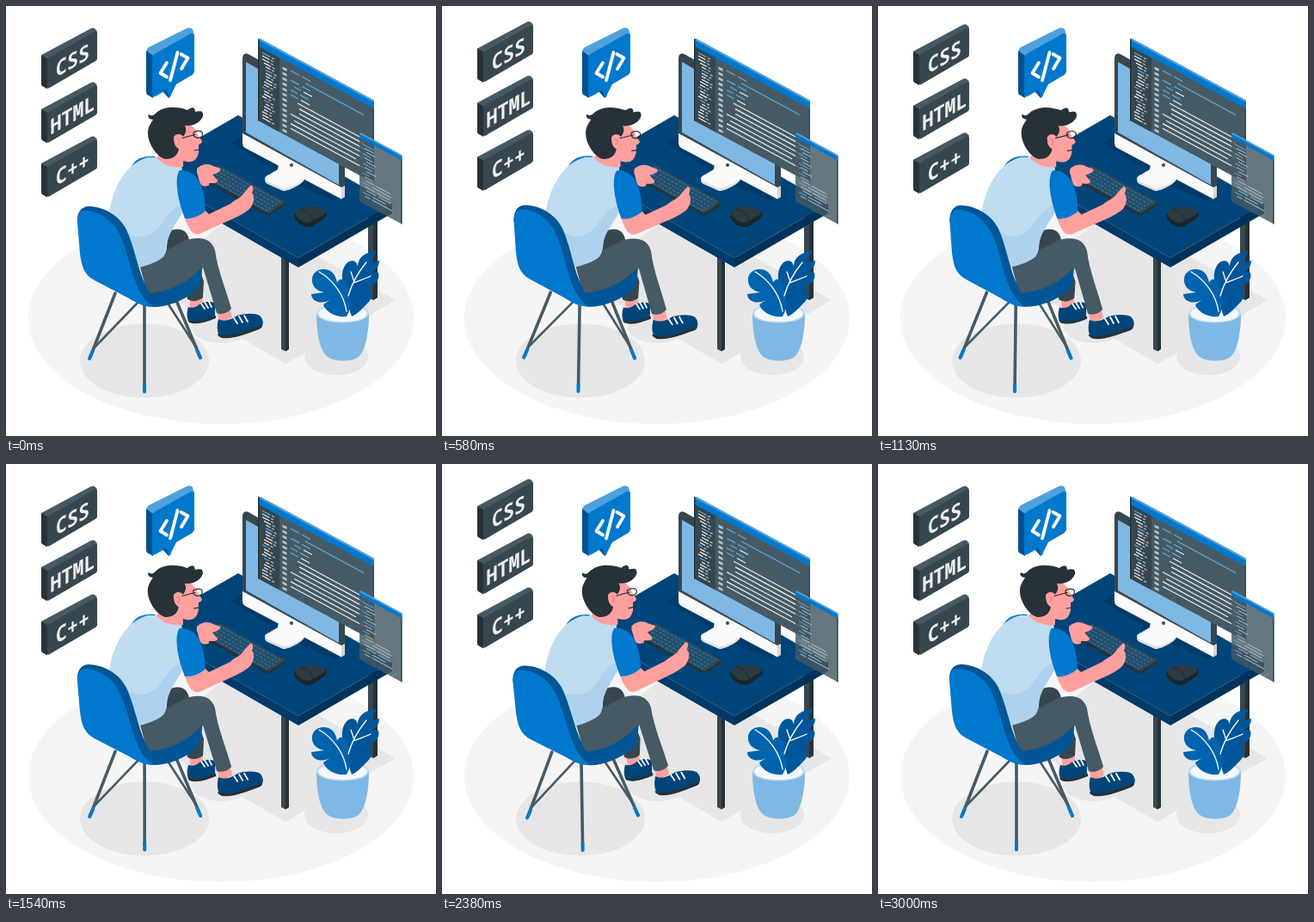
An HTML page for the animation above (3040 ms loop, 500x500 px).

```html
<!DOCTYPE html>
<html lang="en">
<head>
<meta charset="utf-8">
<title>Programmer at a desk</title>
<style>
html, body { margin: 0; width: 100%; height: 100%; overflow: hidden; background: #fff; }
svg { display: block; width: 100%; height: 100%; }
.line { fill: none; stroke-linecap: round; stroke-linejoin: round; }
.b { fill: #0078cd; } .navy { fill: #00457a; } .deep { fill: #00325a; }
.sky { fill: #7fb8e4; } .pale { fill: #bfdcf1; }
.ink { fill: #263238; } .slate { fill: #37474f; } .grey { fill: #455a64; }
.skin { fill: #ffa09f; } .shade { fill: #e6e6e6; }
#signs text { font: 700 25px "Noto Sans Mono", "DejaVu Sans Mono", monospace; fill: #f0f0f0; text-anchor: middle; }
</style>
</head>
<body>
<svg viewBox="0 0 500 500">
  <ellipse cx="250" cy="363" rx="224" ry="123" fill="#f5f5f5"/>
  <g class="shade">
    <path d="M453 342 325 416 161 321 270 240Z"/>
    <ellipse cx="250" cy="374" rx="34" ry="18"/>
    <ellipse cx="161" cy="412.500" rx="75" ry="43"/>
    <ellipse cx="384" cy="408" rx="37" ry="21.500"/>
  </g>

  <g id="desk">
    <path class="slate" d="M421 240h11v99l-5 3-6-3Z"/>
    <path class="ink" d="M427 240h5v99l-5 3Z"/>
    <path class="slate" d="M320 288h9v111l-4 2.500-5-2.500Z"/>
    <path class="ink" d="M325 288h4v111l-4 2.500Z"/>
    <path class="navy" d="M270 127 449 230 340 293 161 190Z"/>
    <path d="M161 190 340 293v11L161 201Z" fill="#003a68"/>
    <path class="deep" d="M340 293 449 230v11L340 304Z"/>
    <path d="M262 160 275 150 393 215 383 227 345 211Z" fill="#003a68"/>
  </g>

  <g id="monitor">
    <path d="M318 180 342 190 347 201C348 205 329 216 322 215L304 207C299 204 301 200 306 198L316 192Z" fill="#e0e0e0"/>
    <path d="M318 178 340 190 347 199C348 203 329 213 322 212L304 204C299 201 301 198 306 196L316 190Z" fill="#fafafa"/>
    <path class="slate" d="M275 61C275 56 278 54 282 56L391 118Q394 120 394 124V222L390 224 275 161Z"/>
    <path class="sky" d="M279 65 387 127V208L279 147Z"/>
    <path d="M275 148 390 211V224.500L278 165Q275 163 275 160Z" fill="#fafafa"/>
    <path d="M390 211 394 209V222L390 224.500Z" fill="#d5d5d5"/>
    <circle class="slate" cx="332" cy="185" r="2"/>
  </g>

  <g id="keyboard">
    <path class="ink" d="M248 186 325 227.500V231L305 244.500 229 203V199Z"/>
    <path class="slate" d="M248 185 325 228 305 241 229 199Z"/>
  </g>
  <path d="M335 244C339 234 352 232 364 235.500 373 237 376 242 370 247L357 256C349 260 336 252 335 244Z" fill="#1b252a"/>
  <path d="M336 241C341 232 353 232 364 235 371 237 374 240 369 243L355 251C348 255 338 247 336 241Z" fill="#2c3a41"/>
  <path class="line" d="M342 236C350 238 354 241 357 249" stroke="#1b252a"/>

  <g id="editor" transform="matrix(1 .54 0 1 293 38)">
    <rect class="grey" width="135" height="95"/>
    <rect class="slate" width="25" height="95"/>
    <rect class="b" width="135" height="8.500"/>
    <path d="M0 0 3-1.500H135V1H0Z" fill="#4da0dc"/>
    <path d="M0 0h1.500v95H0Z" fill="#263238"/>
    <path d="M133.500 8.500h1.500v86.500h-1.500Z" fill="#2c4a60"/>
  </g>
  <g id="panel" transform="matrix(1 .54 0 1 411 148)">
    <rect class="grey" width="49.500" height="79" opacity=".82"/>
    <rect class="b" width="49.500" height="5"/>
    <path d="M0 0 2-1.500H49.500V.5H0Z" fill="#4da0dc"/>
    <path d="M48 5h1.500v74H48Z" fill="#37474f"/>
  </g>

  <g id="plant">
    <path class="sky" d="M361 357C361 385 366 402 374 408 382 414 402 414 410 408 418 400 422 380 422 357Z"/>
    <ellipse class="pale" cx="391.500" cy="357" rx="30.500" ry="11.500"/>
    <ellipse cx="391.500" cy="357.500" rx="28" ry="9.500" fill="#f2f8fc"/>
    <path d="M402 361C397 350 399 338 392 322 389 312 392 301 399 297 405 295 408 298 409 303 409 292 418 286 431 285 427 291 425 295 424 299L434 296C434 303 430 307 426 309L433 310C435 318 430 324 421 326 428 332 426 341 420 346 414 352 409 358 402 361Z" fill="#00569a"/>
    <path d="M396 361C386 363 371 356 369 347L378 341C368 348 355 344 355 335L370 333C360 331 355 325 356 316 358 308 366 304 375 307 382 310 384 316 385 322 388 314 397 318 398 328 399 338 404 348 396 361Z" fill="#0063ae"/>
    <path class="line" d="M364 309C381 319 393 336 396 355M419 298C410 309 402 323 398 337M405 321 401 309M404 322C411 319 418 317 424 314" stroke="#fff" stroke-width="1.300"/>
  </g>

  <g id="bubble">
    <path d="M163 53Q163 50 166 48L210 26Q214 24 217 27L219 34 171 62Z" fill="#4da0dc"/>
    <path d="M163 52 171 58V107L164 103Q163 102 163 100Z" fill="#00508c"/>
    <path d="M182 99 187 97 192 104 189 107Z" fill="#00508c"/>
    <path class="b" d="M170 61Q170 57 174 55L214 32.500Q219 30.500 219 35V75Q219 79 215 81L198 91 190 107 186 98 174 105Q170 107 170 103Z"/>
    <path class="line" d="M187 66 179.500 78 187 82.500M199.500 54 191 86.500M203.500 56 211.500 60.500 204 73" stroke="#fff" stroke-width="3.800"/>
  </g>

  <g id="signs"></g>

  <g id="sitter">
    <path class="skin" d="M213 336 228 336 230 354 215 356Z"/>
    <path class="navy" d="M212 350C217 352 222 350 226 346 233 343 239 343 243 346V363C232 367 221 371 213 367 210 364 210 356 212 350Z"/>
    <path class="ink" d="M211 365C221 368 233 364 244 360V363C232 368 221 371 213 368Z"/>
    <path class="line" d="M227 346 231 352M231 344.500 235 351M236 344 239 350" stroke="#fff" stroke-width="1.700"/>
    <path class="slate" d="M180 268C195 256 210 256 213 272L230 320 229 339C223 344 216 344 211 341L206 312 184 292Z"/>

    <path class="skin" d="M222 189C228 183 236 183 241 186L249 189C251 192 244 195 240 196L246 203C246 207 239 206 236 206 238 209 231 211 227 208 224 204 224 198 222 194Z"/>
    <path class="b" d="M144 191C147 180 157 173 174 175L165 188Z"/>
    <path class="pale" d="M165 176C139 183 125 210 120 240 130 268 143 295 158 306 177 300 186 293 187 280 187 266 196 256 205 240L199 200C207 192 206 185 200 183L178 176Z"/>
    <path d="M120 240C133 265 162 282 181 253 188 242 197 232 204 232L205 240C196 256 187 266 187 280 186 293 177 300 158 306 143 295 130 268 120 240Z" fill="#aed2ed"/>
    <path class="skin" d="M175 176 190 160 206 173 206 187C193 189 181 184 175 176Z"/>
    <path class="skin" d="M194 151 211 137C218 140 222 144 222 148L228 157Q228 160 224 161L224 170C222 179 218 182 210 181L202 179 184 172Z"/>
    <path class="ink" d="M171 132C167 132 164 129 166 126 170 129 172 127 176 123 186 116 199 117 211 121 216 117 220 117 220 123 225 122 230 121 229 128 226 136 217 140 208 139 211 145 208 149 206 152 203 147 195 149 195 154 196 162 198 165 201 166 200 173 195 178 186 178 175 177 158 152 168 137Z"/>
    <ellipse class="skin" cx="200.500" cy="157" rx="5" ry="7"/>
    <path class="line" d="M205 153.500 220 149.500M218 147C225 143 230 146 228 151 225 155 217 154 218 147M225 167 219 168" stroke="#263238" stroke-width="1.200"/>
    <path class="line" d="M199 154C203 155 203 158 200 161" stroke="#e87878"/>

    <path class="skin" d="M207 244 231 237 236 242 261 230C266 225 274 223 277 217L284 209C288 208 288 213 286 217 290 222 288 232 282 237 274 243 265 247 258 250L225 265C216 268 211 256 207 244Z"/>
    <path class="b" d="M202 191C196 198 198 222 208 247 216 248 226 244 232 238 231 215 225 190 202 191Z"/>

    <path class="skin" d="M245 354 260 350 263 362 249 369Z"/>
    <path class="navy" d="M247 364C254 368 263 364 269 360 278 357 290 357 295 360 300 365 300 372 295 375 281 380 263 388 250 385 245 381 245 371 247 364Z"/>
    <path class="ink" d="M246 381C260 387 282 376 298 371 298 373 297 375 294 376 280 381 264 388 251 386 247 384 246 383 246 381Z"/>
    <path class="line" d="M265 363 269 369M271 361 275 368M277 360 281 367" stroke="#fff" stroke-width="1.800"/>
    <path class="grey" d="M156 304C177 298 186 292 187 284L210 272C228 267 239 271 243 284 246 307 256 330 262 352 257 358 250 359 245 357L229 304 225 310C210 325 190 336 165 336Z"/>

    <g class="line" stroke="#455a64" stroke-width="2.600">
      <path d="M153 345 102 398M187 344 222 398"/>
      <path d="M127 334 98 408M197 340 226 409M161 346V442" stroke-width="3.600"/>
      <path d="M101 401 97 410M222 400 226 409M161 441V448.500" stroke="#0078cd" stroke-width="4"/>
    </g>
    <path d="M83 252C82 240 88 232 98 233 115 234 132 244 140 260 150 282 153 306 163 326L167 334C191 332 213 321 228 303 228 313 227 324 222 330 207 343 187 350 172 350 160 349 152 345 145 341Z" fill="#005696"/>
    <path class="b" d="M83 252C83 242 87 237 94 238 110 239 123 250 129 260 139 276 142 296 148 313 153 328 158 341 172 350 159 350 152 345 145 341L103 319C90 312 88 302 86 288Z"/>
  </g>
</svg>
<script>
const $ = id => document.getElementById(id);
const add = (id, html) => $(id).insertAdjacentHTML('beforeend', html);
const bar = (x, y, w, color, h = 1.3) => `<rect x="${x}" y="${y}" width="${w}" height="${h}" fill="${color}"/>`;
const white = '#f2f4f5', blue = '#62abe0', pale = '#b5c3ca';

let seed = 7;
const rand = () => (seed = seed * 16807 % 2147483647) / 2147483647;

// Editor: outline, line marks, then code
for (let y = 13; y < 89; y += 3.6) {
  const x = 5 + Math.floor(rand() * 3) * 2, w = 4 + rand() * 6;
  add('editor', bar(x, y, w, rand() < .3 ? blue : white) + bar(x + w + 1.5, y, 3, pale));
}
for (let y = 17; y < 90; y += 6) add('editor', bar(28.5, y, 5, pale, 3));
[[38, 10], [55, 68], [38, 10], [42, 8], [38, 8], [38, 9], [46, 80], [48, 75],
 [48, 78], [38, 88], [42, 82], [38, 76], [38, 86]].forEach(([x, w], i) => {
  const y = 16 + i * 5.6;
  add('editor', bar(x, y, w, i < 6 ? blue : white));
  if (i < 6 && i != 1) add('editor', bar(x + w + 3, y, 10, i % 2 ? white : blue));
});

// Side panel
for (let i = 0; i < 17; i++) {
  const x = 4 + i % 3 * 2, w = 6 + rand() * 7;
  add('panel', bar(x, 10 + i * 3.7, w, i % 3 ? pale : blue, 1));
  if (i > 10) add('panel', bar(x + w + 2, 10 + i * 3.7, 14 + rand() * 10, pale, 1));
}

// Keys
for (let r = 0; r < 5; r++) {
  const x = 247 - r * 3.8, y = 188 + r * 2.55;
  add('keyboard', `<path d="M${x} ${y}l72 40" stroke="#0078cd" stroke-width="1.7" stroke-dasharray="3.6 1.7"/>`);
}

['CSS', 'HTML', 'C++'].forEach((label, i) => add('signs', `<g transform="translate(0 ${i * 63})">
  <path class="grey" d="M41 57 99 26Q101 25 103 26L106 29 48 63Z"/>
  <path class="ink" d="M41 57 48 61V96.500L42 93Q41 92 41 91Z"/>
  <path class="slate" d="M48 63Q48 61 50 60L104 29.500Q106 28.500 106 31V61Q106 63 104 64L50 95.500Q48 96.500 48 94Z"/>
  <text transform="matrix(.866 -.5 0 1 77.500 72)">${label}</text></g>`));

const ease = p => (1 - Math.cos(Math.PI * p)) / 2;

// Eases 0 to 1, to -1 and back to 0
const sway = p => p < .25 ? ease(p * 4)
  : p < .75 ? 1 - 2 * ease(p * 2 - .5)
  : ease(p * 4 - 3) - 1;

function draw(now) {
  const t = Math.min(now % 3040, 3000);
  $('signs').setAttribute('transform', `translate(0 ${-8.5 * ease(t / 750)})`);
  $('sitter').setAttribute('transform', `rotate(${sway(t / 3000)} 190 285)`);
  requestAnimationFrame(draw);
}
draw(0);
</script>
</body>
</html>
```
